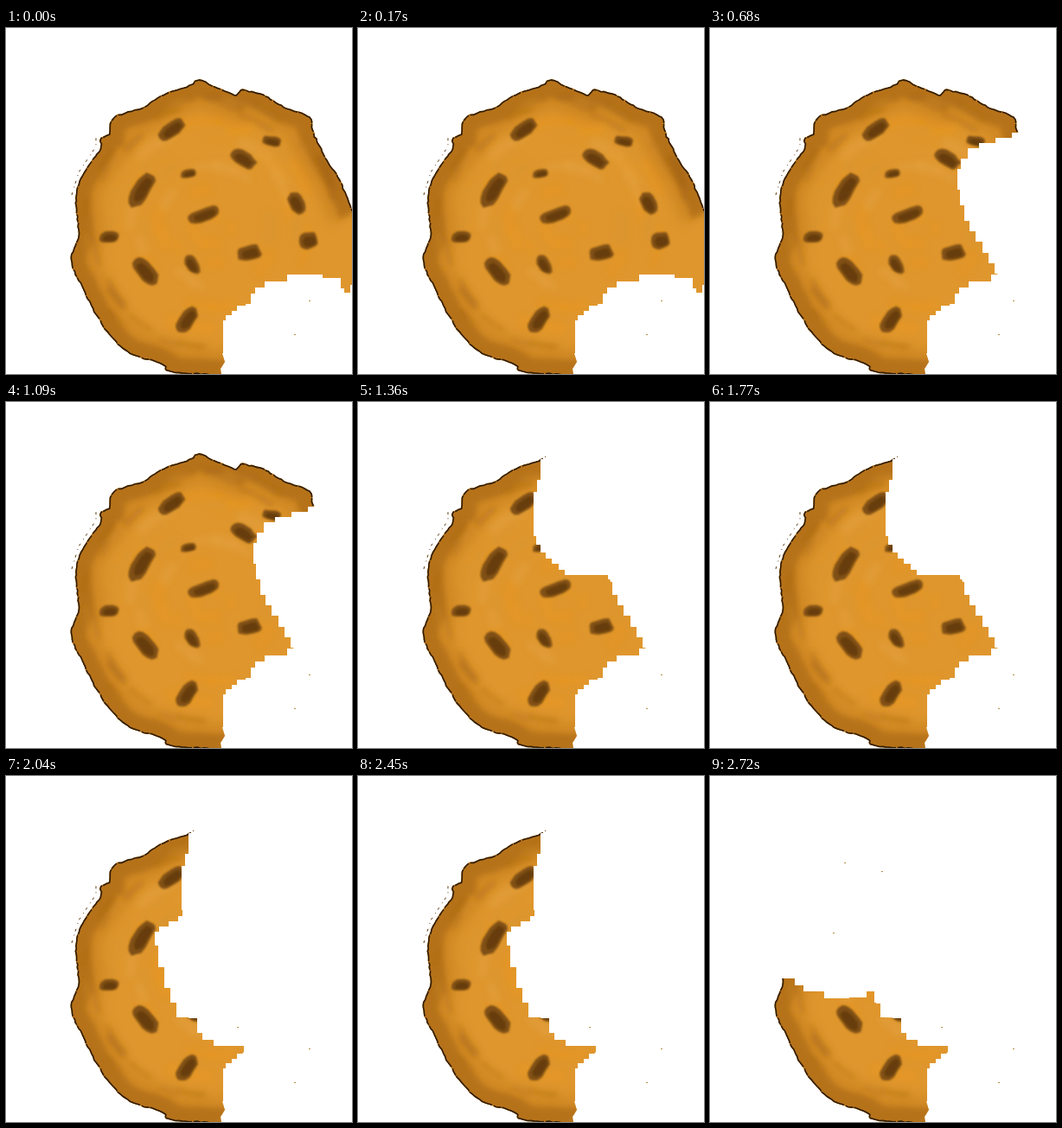
Recreate the animation shown at these times as an HTML page. Size 400x400 px, loop 3400 ms.

```html
<!DOCTYPE html>
<html lang="en">
<head>
<meta charset="utf-8">
<title>Cookie</title>
<style>
html, body { margin: 0; width: 100%; height: 100%; overflow: hidden; background: #fff; }
svg { display: block; width: 100%; height: 100%; }
</style>
</head>
<body>
<svg viewBox="0 0 400 400">
  <defs>
    <clipPath id="shape"><path id="body"/></clipPath>
    <path id="crust"/>
    <filter id="soft" filterUnits="userSpaceOnUse" x="0" y="0" width="440" height="440"><feGaussianBlur stdDeviation="3"/></filter>
    <filter id="wide" filterUnits="userSpaceOnUse" x="0" y="0" width="440" height="440"><feGaussianBlur stdDeviation="7"/></filter>
    <filter id="slight" filterUnits="userSpaceOnUse" x="0" y="0" width="440" height="440"><feGaussianBlur stdDeviation=".9"/></filter>
  </defs>
  <g clip-path="url(#shape)" fill="none">
    <path d="M0 0H400V400H0z" fill="#df962d"/>
    <g id="tints" stroke-linecap="round" filter="url(#soft)"></g>
    <use href="#crust" stroke="#c17c1d" stroke-width="62" opacity=".5" filter="url(#wide)"/>
    <use href="#crust" stroke="#ab6b12" stroke-width="36" opacity=".72" filter="url(#soft)"/>
    <g id="strokes" stroke-linecap="round" filter="url(#soft)"></g>
    <g id="chips" filter="url(#slight)"></g>
    <use href="#crust" stroke="#2e1c05" stroke-width="3.2" stroke-dasharray="23 1 9 2 31 1"/>
  </g>
  <path id="flecks" fill="none" stroke="#5b3a10" stroke-dasharray="3 6 1 4" transform="translate(-4 -3)"/>
  <g id="bites" fill="#fff"></g>
  <g id="crumbs" fill="#b98a45"></g>
</svg>
<script>
const $ = id => document.getElementById(id);
const LOOP = 3400, STEP = 680;

let seed = 7;
const rand = (lo, hi) => {
  seed = (seed * 16807) % 2147483647;
  return lo + (hi - lo) * seed / 2147483647;
};

function add(parent, tag, attrs) {
  const el = document.createElementNS('http://www.w3.org/2000/svg', tag);
  for (const k in attrs) el.setAttribute(k, attrs[k]);
  return $(parent).appendChild(el);
}

const line = pts => 'M' + pts.map(p => p.map(v => v.toFixed(1)).join(' ')).join('L');

// Slightly ragged Catmull-Rom curve through the key points
function ragged(keys) {
  const out = [];
  for (let i = 0; i < keys.length - 1; i++) {
    const [a, b, c, d] = [-1, 0, 1, 2].map(k => keys[Math.max(0, Math.min(keys.length - 1, i + k))]);
    const n = Math.ceil(Math.hypot(c[0] - b[0], c[1] - b[1]) / 4);
    for (let j = 0; j < n; j++) {
      const t = j / n;
      out.push([0, 1].map(k => rand(-.7, .7) + b[k] + t / 2 * (c[k] - a[k] +
        t * (2 * a[k] - 5 * b[k] + 4 * c[k] - d[k] + t * (3 * (b[k] - c[k]) + d[k] - a[k])))));
    }
  }
  return [...out, keys.at(-1)];
}

// Staircase between key points, one step for about every 8 px
function stairs(keys) {
  const out = [keys[0]];
  for (let i = 1; i < keys.length; i++) {
    const [x, y] = keys[i - 1];
    const dx = keys[i][0] - x, dy = keys[i][1] - y;
    const n = Math.ceil(Math.min(Math.abs(dx), Math.abs(dy)) / 8) || 1;
    for (let j = 0; j < n; j++) {
      const mid = Math.round(x + dx * (j + .5) / n);
      out.push([mid, Math.round(y + dy * j / n)], [mid, Math.round(y + dy * (j + 1) / n)]);
    }
    out.push(keys[i]);
  }
  return out;
}

// Clockwise from the bottom to the right side
const rim = [
  [250, 402], [190, 398], [180, 389], [140, 375], [112, 345], [89, 303], [75, 268], [83, 240],
  [80, 196], [88, 170], [108, 140], [108, 129], [119, 122], [124, 103], [160, 91], [178, 78],
  [211, 66], [223, 59], [238, 66], [266, 77], [271, 71], [297, 77], [322, 91], [351, 103],
  [355, 119], [370, 150], [386, 175], [402, 213]
];
const crust = ragged(rim);
const firstBite = stairs([
  [402, 297], [394, 306], [387, 301], [387, 289], [345, 285], [304, 293], [283, 307],
  [283, 319], [270, 321], [251, 338], [250, 376]
]);
$('crust').setAttribute('d', line(crust));
$('body').setAttribute('d', line([...crust, ...firstBite, [253, 386], [248, 394]]) + 'z');
$('flecks').setAttribute('d', line(rim.slice(8, 12)));

// Short brush marks, following the round shape
function brush(parent, radius, from, to, colour, width, opacity) {
  const pts = [0, .5, 1].map(t => {
    const a = from + (to - from) * t;
    return [236 + radius * Math.cos(a), 230 + radius * Math.sin(a)];
  });
  add(parent, 'path', { d: line(pts), stroke: colour, 'stroke-width': width, opacity, 'stroke-linejoin': 'round' });
}
const warm = ['#e8951e', '#e2a03f', '#e9981f', '#d99632'];
for (let i = 0; i < 48; i++) {
  const a = rand(0, 6.28);
  brush('tints', 125 * Math.sqrt(rand(0, 1)), a, a + rand(.15, .4), warm[i % 4], rand(6, 15), .55);
}
for (let i = 0; i < 36; i++) {
  const a = rand(1.6, 6.1);
  brush('strokes', rand(132, 154), a, a + rand(.1, .25), i % 3 ? '#a26410' : '#cd8a2c', rand(4, 8), .35);
}

// Chocolate chips: centre, half length, half width, tilt in degrees
[
  [191, 118, 18, 9, -35], [307, 131, 12, 6, 10], [274, 151, 17, 9, 32], [211, 168, 10, 5, -12],
  [157, 187, 23, 10, -60], [229, 216, 19, 8, -18], [336, 202, 14, 9, 60], [350, 246, 11, 10, -10],
  [119, 242, 12, 7, 0], [161, 281, 19, 10, 48], [215, 273, 13, 7, 60], [281, 260, 15, 9, -12],
  [209, 338, 17, 9, -52]
].forEach(([x, y, a, b, tilt]) => {
  const pts = Array.from({ length: 14 }, (_, i) => {
    const t = i / 14 * 2 * Math.PI, r = rand(.86, 1.06);
    const boxy = v => Math.sign(v) * Math.abs(v) ** .75;
    return [a * r * boxy(Math.cos(t)), b * r * boxy(Math.sin(t))];
  });
  const place = `translate(${x} ${y}) rotate(${tilt})`;
  add('chips', 'path', { d: line(pts) + 'z', fill: '#7f5012', transform: place });
  add('chips', 'path', { d: line(pts) + 'z', fill: '#5f380a', opacity: .75, transform: place + ' translate(1 1) scale(.7 .6)' });
});

// Each bite: its stepped edge, then the far side that closes it
const bites = [
  [[[358, 121], [302, 139], [286, 163], [286, 187], [296, 223], [333, 284]],
    [[325, 290], [325, 310], [402, 320], [402, 121]]],
  [[[217, 64], [211, 66], [211, 90], [203, 104], [203, 155], [213, 174], [243, 200], [290, 200]],
    [[292, 208], [306, 208], [364, 150], [364, 50], [217, 50]]],
  [[[204, 162], [172, 180], [172, 196], [187, 245], [200, 279], [221, 280], [221, 297], [246, 312], [275, 312]],
    [[275, 319], [268, 326], [268, 340], [345, 285], [300, 150], [204, 150]]],
  [[[60, 234], [93, 234], [113, 249], [150, 257], [172, 256], [190, 249], [194, 263], [201, 279]],
    [[230, 280], [230, 50], [60, 50]]]
].map(([edge, far]) => add('bites', 'path', { d: line([...stairs(edge), ...far]) + 'z' }));

// Crumbs: number of bites that leave it, place
const crumbs = [
  [0, 350, 315], [0, 333, 354], [3, 267, 290], [4, 155, 100], [4, 198, 110], [4, 142, 181]
].map(([after, x, y]) => ({ after, el: add('crumbs', 'rect', { x, y, width: 2, height: 1 }) }));

function draw(ms) {
  const eaten = Math.floor((ms % LOOP) / STEP);
  const show = (el, on) => el.setAttribute('visibility', on ? 'visible' : 'hidden');
  bites.forEach((el, i) => show(el, i < eaten));
  crumbs.forEach(c => show(c.el, c.after <= eaten));
}

let start;
function tick(now) {
  start ??= now;
  draw(now - start);
  requestAnimationFrame(tick);
}
draw(0);
requestAnimationFrame(tick);
</script>
</body>
</html>
```
